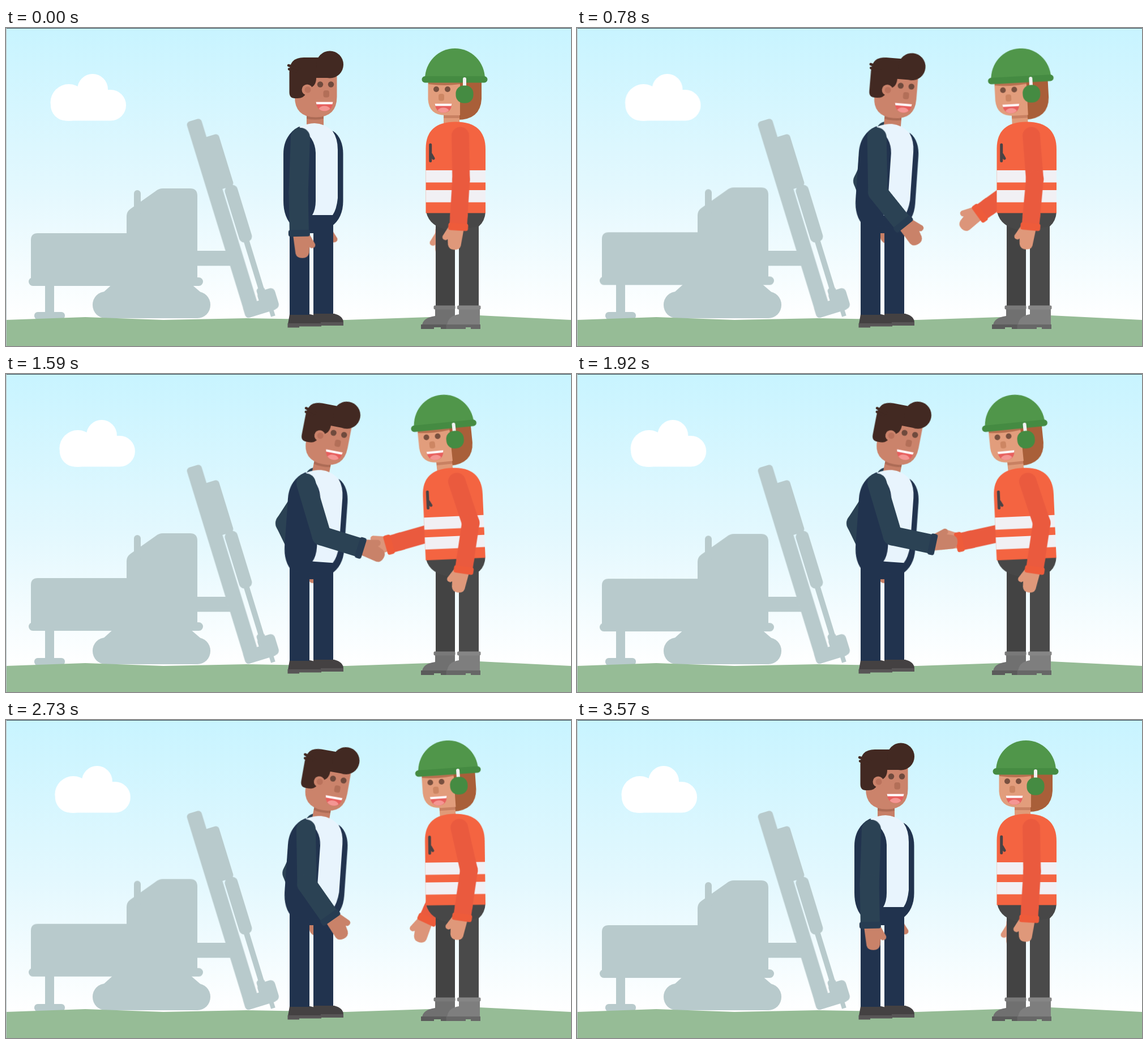
Write an HTML page that moves like this. It is 998x561 px and loops after 3.6 s.

```html
<!DOCTYPE html>
<html lang="en">
<head>
<meta charset="utf-8">
<title>Handshake on site</title>
<style>
html, body { margin: 0; width: 100%; height: 100%; overflow: hidden; background: #fff; }
svg { display: block; width: 100vw; height: 100vh; }

.move { animation: 3.6s cubic-bezier(.333, 0, .667, 1) infinite; }
.cloud { animation: drift 1.8s cubic-bezier(.37, 0, .63, 1) infinite alternate; }
.cab { animation: bob .3s cubic-bezier(.37, 0, .63, 1) infinite alternate; }
@keyframes drift { to { transform: translateX(16.4px); } }
@keyframes bob { to { transform: translateY(-2.5px); } }

/* man */
.m-lean { animation-name: m-lean; transform-origin: 543px 335px; }
.m-head { animation-name: m-head; transform-origin: 546px 160px; }
.m-eyes { animation-name: blink; transform-origin: 564px 100px; }
.m-upper { animation-name: m-upper; }
.m-fore { animation-name: m-fore; }
.m-hand { animation-name: m-hand; }
.m-far-upper { animation-name: m-far-upper; }
.m-far-fore { animation-name: m-far-fore; }
@keyframes m-lean {
  0%, 6.7%, 90.8%, 100% { transform: translateY(0) rotate(0deg); }
  23.3%, 75.8% { transform: translateY(.8px) rotate(4deg); }
}
@keyframes m-head {
  0%, 19.5%, 86.7%, 100% { transform: rotate(0deg); }
  30%, 72.5% { transform: rotate(7deg); }
}
@keyframes blink {
  0%, 29.2%, 34.2%, 100% { transform: scaleY(1); }
  31%, 32.4% { transform: scaleY(.12); }
}
@keyframes m-upper {
  0%, 15%, 81.7%, 100% { transform: rotate(2deg); }
  33.3%, 65.8% { transform: rotate(-20.6deg); }
}
@keyframes m-fore {
  0%, 10.5%, 86%, 100% { transform: rotate(-3deg); }
  30% { transform: rotate(-60deg); }
  35%, 51.7% { transform: rotate(-62deg); }
  43.3%, 60% { transform: rotate(-56deg); }
  66.7% { transform: rotate(-61deg); }
}
@keyframes m-hand {
  0%, 27.5%, 66.7%, 100% { transform: rotate(0deg); }
  21%, 76% { transform: rotate(9deg); }
  35%, 51.7% { transform: rotate(-14deg); }
  43.3%, 60% { transform: rotate(14deg); }
}
@keyframes m-far-upper {
  0%, 6.7%, 88.9%, 100% { transform: rotate(-3.4deg); }
  28.3%, 70% { transform: rotate(33deg); }
}
@keyframes m-far-fore {
  0%, 6.7%, 88.9%, 100% { transform: rotate(0deg); }
  28.3%, 70% { transform: rotate(-59deg); }
}

/* woman */
.w-lean { animation-name: w-lean; transform-origin: 793px 330px; }
.w-head { animation-name: w-head; transform-origin: 790px 160px; }
.w-upper { animation-name: w-upper; }
.w-fore { animation-name: w-fore; }
.w-far-upper { animation-name: w-far-upper; }
.w-far-fore { animation-name: w-far-fore; }
.w-far-hand { animation-name: w-far-hand; }
@keyframes w-lean {
  0%, 21.7%, 80%, 100% { transform: rotate(0deg); }
  32.5%, 68.3% { transform: rotate(-2.5deg); }
}
@keyframes w-head {
  0%, 8.3%, 91.7%, 100% { transform: translateX(0) rotate(0deg); }
  23.3%, 75% { transform: translateX(-5px) rotate(-3.2deg); }
}
@keyframes w-upper {
  0%, 16.7%, 85.8%, 100% { transform: rotate(-1deg); }
  32.5%, 70.8% { transform: rotate(-16deg); }
}
@keyframes w-fore {
  0%, 16.7%, 85.8%, 100% { transform: rotate(4.5deg); }
  32.5%, 70.8% { transform: rotate(27deg); }
}
@keyframes w-far-upper {
  0%, 18.3%, 78%, 100% { transform: rotate(-4deg); }
  31.7%, 65% { transform: rotate(14.5deg); }
}
@keyframes w-far-fore {
  0%, 7.5%, 83.5%, 100% { transform: rotate(7deg); }
  26.7%, 65% { transform: rotate(65deg); }
  35%, 51.7% { transform: rotate(66deg); }
  43.3%, 60% { transform: rotate(62deg); }
}
@keyframes w-far-hand {
  0%, 31%, 66.7%, 100% { transform: rotate(0deg); }
  20%, 76% { transform: rotate(-12deg); }
  35%, 51.7% { transform: rotate(2deg); }
  43.3%, 60% { transform: rotate(-10deg); }
}

.sleeve { stroke-linecap: round; fill: none; }
.m-sleeve { stroke: #2b4254; stroke-width: 34; }
.w-sleeve { stroke: #ea5a3e; stroke-width: 31; }
</style>
</head>
<body>
<svg viewBox="0 0 998 561" preserveAspectRatio="none">
  <defs>
    <linearGradient id="sky" x1="0" y1="0" x2="0" y2="1">
      <stop offset="0" stop-color="#c8f4ff"/>
      <stop offset=".55" stop-color="#e3f8fe"/>
      <stop offset="1" stop-color="#fff"/>
    </linearGradient>
    <path id="hand" d="M-11 2L-7 36Q-5 44 5 44Q15 44 17 35L18 25L21 27Q29 27 28 20L18 2Z"/>
    <rect id="m-cuff" x="-19" y="-6" width="38" height="12" rx="4" fill="#273c52"/>
    <rect id="w-cuff" x="-17.5" y="-6.5" width="35" height="13" rx="4" fill="#ee5b3a"/>
    <g id="mouth">
      <path d="M0 0H30Q29 16 15 16Q2 16 0 0Z" fill="#e75f5e"/>
      <path d="M5 12Q8 7 15 7Q22 7 25 12Q21 16 15 16Q9 16 5 12Z" fill="#f49693"/>
      <path d="M0 0H30L29 4H1Z" fill="#fff"/>
    </g>
  </defs>

  <rect width="998" height="515" fill="url(#sky)"/>

  <g class="cloud" fill="#fff">
    <rect x="79" y="109" width="133" height="54.5" rx="27"/>
    <circle cx="111" cy="131.5" r="32.5"/>
    <circle cx="153" cy="108" r="27"/>
  </g>

  <g fill="#b8cacc">
    <rect x="69" y="448" width="16" height="58"/>
    <rect x="50" y="501" width="54" height="13" rx="6"/>
    <rect x="153" y="465" width="208" height="47" rx="23"/>
    <path d="M190 450H325L346 468H170Z"/>
    <rect x="325" y="393" width="75" height="26.5"/>
    <g transform="translate(330 163) rotate(-17.1)">
      <rect x="-12.5" width="27" height="362" rx="6"/>
      <rect x="8" y="35" width="28" height="96" rx="6"/>
      <rect x="17" y="129" width="23" height="104" rx="9"/>
      <rect x="23" y="226" width="10" height="105"/>
      <rect x="19" y="317" width="15" height="20" rx="5"/>
      <rect x="18" y="323" width="32" height="38" rx="8"/>
      <rect x="-12.5" y="338" width="58" height="24" rx="6"/>
      <rect x="30" y="355" width="8" height="17"/>
    </g>
    <g class="cab">
      <path d="M44 445V374Q44 362 56 362H213V332Q213 324 220 319L264 288Q270 283 277 283H325Q338 283 338 296V445Z"/>
      <rect x="226" y="286" width="12" height="46" rx="6"/>
      <rect x="40" y="440" width="308" height="15" rx="7.5"/>
    </g>
  </g>

  <path d="M0 515L140 510L278 515L425 512L600 515L836 507L998 515V561H0Z" fill="#96bc96"/>

  <!-- man -->
  <g transform="translate(546 182)">
    <g class="move m-far-upper">
      <path class="sleeve m-sleeve" d="M0 0V97"/>
      <g transform="translate(0 97)">
        <g class="move m-far-fore">
          <use href="#hand" y="74" fill="#c67f66"/>
          <path class="sleeve m-sleeve" d="M0 0V58"/>
          <use href="#m-cuff" y="74"/>
        </g>
      </g>
    </g>
  </g>
  <path d="M543 504H580Q596 508 596 520H543Z" fill="#444142"/>
  <path d="M540 519H596V525H540Z" fill="#585556"/>
  <path d="M501 505H537Q556 508 556 522H498Z" fill="#444142"/>
  <path d="M497.5 521H557V526.5H518V528.5H497.5Z" fill="#585556"/>
  <path d="M501 330H578V504H543V362H536V506H501Z" fill="#21334e"/>
  <g class="move m-lean">
    <g class="move m-head">
      <rect x="531" y="145" width="30" height="34" fill="#c77f67"/>
      <path d="M531 155H561V160Q546 163 531 160Z" fill="#ac6b55"/>
      <path d="M510 85H584.5V121Q584.5 157.500 547 157.500Q510 157.500 510 121Z" fill="#cb836b"/>
      <path d="M500.5 78Q500.5 52 526 52H572V88H548Q548 104 534 106L530 115Q526 124 515 124H510Q500.5 124 500.5 113Z" fill="#422922"/>
      <circle cx="572" cy="64.5" r="24" fill="#422922"/>
      <path d="M499 66L518 72M500 72.5L512 76" stroke="#422922" stroke-width="4.5" stroke-linecap="round"/>
      <circle cx="532" cy="109" r="9.5" fill="#cb836b"/>
      <circle cx="533" cy="109" r="5.5" fill="#ba725c"/>
      <g class="move m-eyes" fill="#6f4a3d">
        <circle cx="555" cy="99.5" r="5.2"/>
        <circle cx="574" cy="99.5" r="5.2"/>
      </g>
      <rect x="560.5" y="110" width="10.5" height="12.5" rx="4" fill="#b36f58"/>
      <use href="#mouth" x="547.5" y="130.5"/>
    </g>
    <path d="M490 222C490 195 505 180 518 174L578 182C590 190 595.5 205 595.5 222V305Q595.5 335 575 350H507Q490 335 490 305Z" fill="#21334e"/>
    <path d="M518 175Q533 168 545 168Q562 168 577 182Q586 195 586 215V300Q584 320 577 330H541Q547 320 547 305V220Q546 192 518 175Z" fill="#e8f4fd"/>
  </g>

  <!-- reaching arm of the woman, then near arm of the man over it -->
  <g class="move w-lean">
    <g transform="translate(775 203)">
      <g class="move w-far-upper">
        <path class="sleeve w-sleeve" d="M0 0V77"/>
        <g transform="translate(0 77)">
          <g class="move w-far-fore">
            <g transform="translate(0 80)">
              <g class="move w-far-hand" fill="#dc957a">
                <use href="#hand" transform="scale(-.95 .95)"/>
              </g>
            </g>
            <path class="sleeve w-sleeve" d="M0 0V62"/>
            <path d="M-15.5 55H15.5V76H-15.5Z" fill="#ea5a3e"/>
            <use href="#w-cuff" y="80"/>
          </g>
        </g>
      </g>
    </g>
  </g>
  <g class="move m-lean">
    <g transform="translate(520 193)">
      <g class="move m-upper">
        <path class="sleeve m-sleeve" d="M0 0V97"/>
        <g transform="translate(0 97)">
          <g class="move m-fore">
            <g transform="translate(0 72)">
              <g class="move m-hand" fill="#c98269">
                <use href="#hand"/>
              </g>
            </g>
            <path class="sleeve m-sleeve" d="M0 0V53"/>
            <path d="M-17 48H17V70H-17Z" fill="#2b4254"/>
            <use href="#m-cuff" y="72"/>
          </g>
        </g>
      </g>
    </g>
  </g>

  <!-- woman -->
  <path d="M759 330H835V490H800V360H793V490H759Z" fill="#4a4a4a"/>
  <path d="M759 330H793V490H759Z" fill="#434343"/>
  <path d="M758 494H793V525H735Q736 511 758 508Z" fill="#707070"/>
  <path d="M733 523H782V531H768V528H756V531H733Z" fill="#5b5b5b"/>
  <rect x="755.5" y="489.5" width="38" height="7" rx="2" fill="#797979"/>
  <path d="M800 494H837V525H779Q780 508 800 505Z" fill="#7e7e7e"/>
  <path d="M777.5 523H838V531H821V528H812V531H777.5Z" fill="#676767"/>
  <rect x="797" y="489.5" width="41.5" height="7" rx="2" fill="#868686"/>
  <g class="move w-lean">
    <g class="move w-head">
      <path d="M802 92H840V125Q838 162 797 162Z" fill="#a95f39"/>
      <rect x="773" y="145" width="28" height="32" fill="#e09a78"/>
      <path d="M773 153H801V159H773Z" fill="#c98162"/>
      <path d="M745.5 92H802V154H775Q747 153 745.5 126Z" fill="#e29d7c"/>
      <path d="M746 94H802V99Q774 103 746 99Z" fill="#b87150"/>
      <g fill="#79503f">
        <circle cx="760" cy="108" r="5"/>
        <circle cx="780" cy="108" r="5"/>
      </g>
      <rect x="764" y="116" width="10" height="12.5" rx="4" fill="#cd8663"/>
      <use href="#mouth" x="757.5" y="133.5"/>
      <path d="M740 90A53 54 0 0 1 846 90Z" fill="#50964a"/>
      <rect x="734.5" y="85" width="116" height="11.5" rx="5.7" fill="#458b42"/>
      <rect x="807" y="87" width="6" height="20" rx="3" fill="#f1f2f2"/>
      <rect x="794.5" y="101.5" width="31" height="31" rx="14" fill="#458b42"/>
    </g>
    <path d="M742 324H847Q846 341 835 350L785 357Q748 352 742 324Z" fill="#474747"/>
    <path d="M741.5 212Q742 165.500 794 165.500Q847 165.500 847 214V326.5H741.5Z" fill="#f46441"/>
    <path d="M741.5 251H847V272.5H741.5ZM741.5 286H847V307.5H741.5Z" fill="#f1f0f4"/>
    <path d="M749.7 206V234.5M751 223L755 230" fill="none" stroke="#4a4345" stroke-width="5" stroke-linecap="round"/>
    <g transform="translate(802.5 190)">
      <g class="move w-upper">
        <path class="sleeve w-sleeve" d="M0 0V77"/>
        <g transform="translate(0 77)">
          <g class="move w-fore">
            <use href="#hand" transform="translate(0 83) scale(-.95 .95)" fill="#df987a"/>
            <path class="sleeve w-sleeve" d="M0 0V65"/>
            <path d="M-15.5 60H15.5V80H-15.5Z" fill="#ea5a3e"/>
            <use href="#w-cuff" y="84"/>
          </g>
        </g>
      </g>
    </g>
  </g>

  <rect width="998" height="1" fill="#37474f"/>
  <rect width="1" height="561" fill="#b9c5c8"/>
</svg>
</body>
</html>
```
